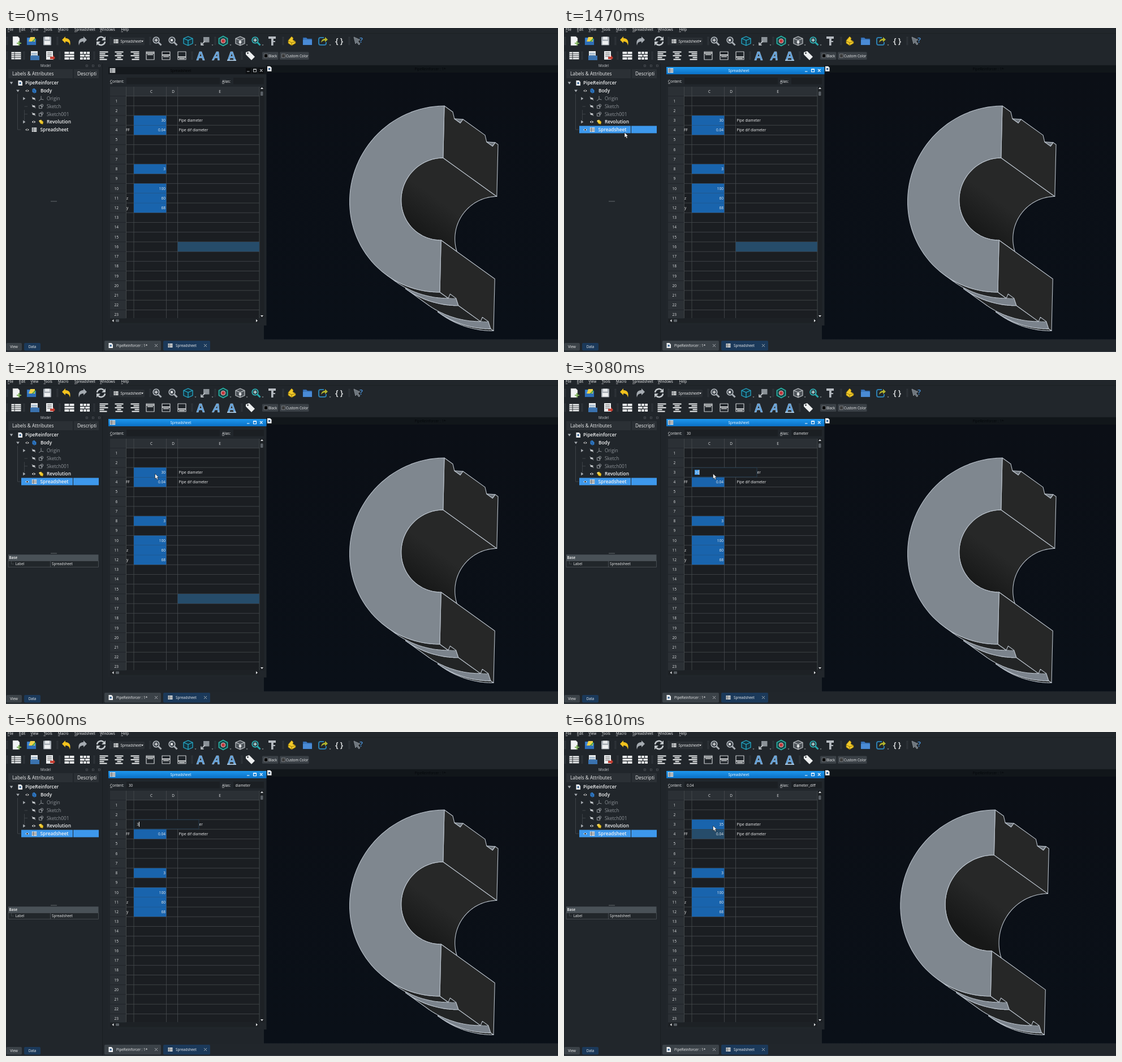
An HTML page that plays this animation: 976x574 px, repeating every 8 s.

```html
<!DOCTYPE html>
<html lang="en">
<head>
<meta charset="utf-8">
<title>Parametric pipe</title>
<style>
html,body{margin:0;width:100%;height:100%;overflow:hidden;background:#21262b}
svg{display:block;width:100vw;height:100vh}
text{font-family:"Open Sans","Noto Sans",sans-serif;white-space:pre}
</style>
</head>
<body>
<svg id="stage" viewBox="0 0 976 574" xmlns="http://www.w3.org/2000/svg"></svg>
<script>
const LOOP = 8000;
const BG = '#21262b', CELL = '#1b1e22', HEAD = '#2b3035', GRID = '#484c50';
const BLUE = '#1964ad', PICK = '#264c6a', HI = '#3d98ec', FG = '#eff0f1';

// Markup helpers
const rect = (x, y, w, h, fill, more = '') =>
  `<rect x="${x}" y="${y}" width="${w}" height="${h}" fill="${fill}" ${more}/>`;
const path = (d, fill = 'none', stroke = 'none', w = 1, more = '') =>
  `<path d="${d}" fill="${fill}" stroke="${stroke}" stroke-width="${w}" stroke-linejoin="round" ${more}/>`;
const circle = (x, y, r, fill, stroke = 'none', w = 1) =>
  `<circle cx="${x}" cy="${y}" r="${r}" fill="${fill}" stroke="${stroke}" stroke-width="${w}"/>`;
const text = (x, y, s, size = 6.4, fill = FG, more = '') =>
  `<text x="${x}" y="${y}" font-size="${size}" fill="${fill}" ${more}>${s}</text>`;
const group = (id, body) => `<g id="${id}">${body}</g>`;
const at = (x, y, body) => `<g transform="translate(${x} ${y})">${body}</g>`;
const MID = 'text-anchor="middle"', END = 'text-anchor="end"', BOLD = 'font-weight="600"';

// Shared icons, centred on 0,0
const tableIcon = (w, h, line = BG) =>
  rect(-w / 2, -h / 2, w, h, '#eceeef') +
  path(`M${-w / 2} ${-h / 4}h${w}M${-w / 2} 0h${w}M${-w / 2} ${h / 4}h${w}M${-w / 6} ${-h / 2}v${h}`, 'none', line, h / 14);
const docIcon = path('M-3.5-4.5H1.5L4-2V4.5H-3.5Z', '#eef0f2') + rect(-1.5, -1.3, 3.2, 3.2, '#35618f');
const grip = (x, y) => path(`M${x} ${y - 7}v14M${x + 1.8} ${y - 7}v14`, 'none', '#555b61', .8, 'stroke-dasharray="1 1.2"');
const lens = (c, inner) => path('M2 2L7.5 7.5', 'none', c, 3) + circle(-1.5, -1.5, 5.3, '#343b42', c, 1.8) + inner;
const cube = (fill, line) => path('M0-8L8-4.5V4.5L0 8L-8 4.5V-4.5Z', fill, line, 1.2) + path('M-8-4.5L0-1L8-4.5M0-1V8', 'none', line, 1.2);
const page = path('M-6-8H3L6-5V8H-6Z', '#f1f3f4', '#888', .5);
const folder = (c) => path('M-8-6H-2L0-4H8V7H-8Z', c, '#163a68', .6);
const bend = (c) => path('M-8-2L-2-8V-5C5-5 8 0 6 8C5 2 2 1-2 1V4Z', c);
const bars = (list, x) => list.map((w, i) => rect(x(w), -7.5 + i * 3.3, w, 2, '#eceeef')).join('');
const vbox = (y) => path('M-7-7H7V7H-7Z', 'none', '#c9cccf', 1.2) + rect(-7, y, 14, 1.8, '#eceeef') + rect(-5, y + 3, 10, 1.4, '#eceeef');
const bricks = (d) => rect(-8.5, -7, 17, 14, '#eceeef') + path(d, 'none', BG, 1.2);
const letterA = (more) => text(0, 7.5, 'A', 21, '#5d9fda', `${MID} font-weight="700" stroke="#cfe3f5" stroke-width=".4" ${more}`);

function toolbars() {
  const menu = [['File', 3], ['Edit', 23], ['View', 43.5], ['Tools', 66.5], ['Macro', 92], ['Spreadsheet', 121], ['Windows', 166], ['Help', 203.5]];
  const top = [
    [18, page + path('M1 4H9M5 0V8', 'none', '#7fb35c', 2.2)],
    [45, folder('#3f86d6') + path('M-6 5L-2-7H6V4Z', '#f0d24a') + path('M0 3L7-4', 'none', '#4aa64a', 2.2) + rect(-8, 1, 16, 6, '#2f6fb8')],
    [73, rect(-7, -7.5, 14, 15, '#a9b0b7', 'rx="1"') + rect(-4, -7.5, 8, 5, '#e7eaec') + rect(-5, 0, 10, 6.5, '#eef0f1')],
    [107, bend('#f2c21d')],
    [135, `<g transform="scale(-1 1)">${bend('#a5abb1')}</g>`],
    [168, path('M-7-1A7 7 0 0 1 5-5M7 1A7 7 0 0 1-5 5', 'none', '#c3c8cc', 2.6) + path('M8-8V-1H1ZM-8 8V1H-1Z', '#c3c8cc')],
    [267, lens('#a8aeb4', path('M-4.5-1.5H1.5M-1.5-4.5V1.5', 'none', '#e5e7e9', 1.5))],
    [295, lens('#a8aeb4', rect(-4, -3.5, 4, 4, '#e5e7e9'))],
    [322, cube('#16333e', '#25b5d6')],
    [352, rect(-3, -7, 10.5, 9.5, '#8b9298') + path('M-7 7L0 0M-7 2.5V7H-2.5', 'none', '#b3b8bd', 1.8)],
    [384, path('M0-8.5L7.5-4.5V4.5L0 8.5L-7.5 4.5V-4.5Z', '#173f42', '#28b3a5', 1.8) + circle(0, 0, 3.8, '#c43a3f', '#eee', .8)],
    [414, cube('#4d5359', '#c0c5c9') + circle(0, 2, 2.4, '#dfe2e4')],
    [442, lens('#28a8ac', path('M-4.5-1.5H1.5M-1.5-4.5V1.5', 'none', '#bdeff0', 1.6))],
    [470, rect(-1, -8, 3.6, 16, '#b5bac0') + path('M-6-8H7V-4H2.6V0H6V2H-1V-4H-6Z', '#b5bac0')],
    [505, path('M-6-1L0-8L3-5L2-2L7 1V4L0 8L-6 4Z', '#f0c829', '#8a6e0a', .8) + path('M-6 0L0 3L7 1M0 3V8', 'none', '#8a6e0a', .9)],
    [533, folder('#3b77be') + rect(-8, -2, 16, 9, '#4a8bd6')],
    [560, path('M2-6H-4Q-7-6-7-3V4Q-7 7-4 7H3Q6 7 6 4V2', 'none', '#2c7fb0', 2) + path('M-3 3Q-2-4 4-4V-7L9-2.5L4 2V-1Q0-1-3 3Z', '#b3b52e')],
    [589, text(0, 5, '{ }', 14, '#e8eaeb', `${MID} ${BOLD}`)],
    [622, path('M-7-7L4-2L0 0L4 5L2 7L-2 2L-4 5Z', '#6d757c', '#9da3a9', .7) + text(6, 3, '?', 13, '#4b96dd', `${MID} ${BOLD}`)]
  ];
  const low = [
    [18, tableIcon(17, 13)],
    [51, rect(-7, -8, 12, 10, '#eceeef') + rect(-8, 0, 16, 8, '#3a72ae') + path('M-6-4H4M-6-1H4', 'none', '#45749f')],
    [78, rect(-7, -8, 12, 15, '#eceeef') + path('M-5-5H3M-5-2H3M-5 1H3', 'none', '#666') + path('M0 2H5V-1L9 4L5 8V6H0Z', '#c43d31')],
    [112, bricks('M-9-2.3H9M-9 2.3H9M0-7V-2.3M0 2.3V7')],
    [139.5, bricks('M-9-2.3H9M-9 2.3H9M-3-7V-2.3M3-7V-2.3M0-2.3V2.3M-3 2.3V7M3 2.3V7')],
    [173, bars([15, 10, 15, 8, 13], () => -7.5)],
    [200, bars([15, 9, 15, 7, 13], w => -w / 2)],
    [228, bars([15, 10, 15, 8, 13], w => 7.5 - w)],
    [255, vbox(-5.5)], [283, vbox(-2)], [311, vbox(1.5)],
    [344, letterA('')], [372, letterA('font-style="italic"')],
    [399, letterA('') + rect(-8, 7.5, 16, 1.6, '#b9d7f0')],
    [432, path('M-8-6L-2-8L8 2L2 8L-8-2Z', '#eceeef') + circle(-4.5, -4.5, 1.3, BG)]
  ];
  const swatch = (x, w, c, s) => rect(x, 42.5, w, 13.5, '#3a4046', 'rx="1.5"') +
    rect(x + 3.5, 46, 6, 6.5, c, 'stroke="#8a8f94" stroke-width=".7"') + text(x + 11, 51.6, s, 6.2);
  return menu.map(([s, x]) => text(x, 5.3, s, 6.3) + rect(x, 6.5, 3.4, .6, FG)).join('') +
    path('M0 9.5H976', 'none', '#1c2024') +
    [1, 90, 184, 254, 369, 489, 606].map(x => grip(x, 23)).join('') +
    [1, 31, 94, 155, 328, 416].map(x => grip(x, 49)).join('') +
    top.map(([x, s]) => at(x, 23, s)).join('') + low.map(([x, s]) => at(x, 49, s)).join('') +
    [335, 365, 397, 426, 454, 573].map(x => path(`M${x - 1.5} 29.5h3l-1.5 1.8z`, '#a0a5a9')).join('') +
    rect(187, 17, 58, 13.5, '#2a2f34', 'rx="1.5"') + at(194.5, 23.5, tableIcon(8, 7)) +
    text(202.5, 25.7, 'Spreadsheet', 6.3) + path('M239 22.5h4l-2 2.6z', FG) +
    swatch(453, 28.5, '#000', 'Black') + swatch(484, 51.5, '#3a3a3a', 'Custom Color');
}

function modelPanel() {
  const eye = (x, y) => at(x, y, path('M-3.2 0Q0-3.6 3.2 0Q0 3.6-3.2 0Z', '#e8eaec') + circle(0, 0, 1.2, '#111'));
  const shut = (y) => at(49, y, path('M-3.2 0Q0-3.6 3.2 0Q0 3.6-3.2 0Z', '#b9bdc1') + path('M-3.2-2.8L3.2 2.8', 'none', '#e4e6e8', 1));
  const down = (x, y) => path(`M${x - 2.8} ${y - 1.8}h5.6l-2.8 4.2z`, '#a9aeb3');
  const right = (x, y) => path(`M${x - 1.8} ${y - 2.8}v5.6l4.2-2.8z`, '#a9aeb3');
  const sketch = (y) => at(62, y, path('M-3.5-1.5H1.5V3.5H-3.5Z', 'none', '#a4a9ad', .9) + circle(1.5, -1.5, 2.2, 'none', '#a4a9ad', .9));
  const Y = i => 97.4 + i * 13.8;
  const name = (x, i, s, dim) => text(x, Y(i) + 3, s, 8.3, dim ? '#8d9297' : '#f0f1f2', dim ? '' : BOLD);
  return text(70, 69.3, 'Model', 6.2, '#c9ccd0', MID) +
    [143, 154, 165].map(x => rect(x - 1.5, 65.5, 3, 3, 'none', 'stroke="#565b60" stroke-width=".7"')).join('') +
    rect(4, 73, 114, 16, HEAD) + rect(120, 73, 44, 16, HEAD) +
    text(11, 84, 'Labels &amp; Attributes', 8.3) + text(126, 84, 'Descripti', 8.3) +
    path('M20.5 117V180H26M32.5 145V166M32.5 139H38M32.5 152.5H38', 'none', '#4a4f54', .7) +
    group('row', rect(27, 173.4, 91, 13, HI) + rect(119, 173.4, 45, 13, HI)) +
    down(9.5, Y(0)) + at(25, Y(0), docIcon) + name(34, 0, 'PipeReinforcer') +
    down(21, Y(1)) + eye(37.5, Y(1)) + at(50, Y(1), path('M-3.5-3L0-4.5L3.5-1V3L0 4.5L-3.5 2Z', '#2f78c4') + path('M-3.5-3L0 0V4.5', 'none', '#173f70', .8)) + name(61, 1, 'Body') +
    right(32, Y(2)) + shut(Y(2)) + at(62, Y(2), path('M0-4.5V1L-4 4M0 1L4.5 2', 'none', '#8d9297')) + name(72, 2, 'Origin', 1) +
    shut(Y(3)) + sketch(Y(3)) + name(72, 3, 'Sketch', 1) +
    shut(Y(4)) + sketch(Y(4)) + name(72, 4, 'Sketch001', 1) +
    right(32, Y(5)) + eye(49, Y(5)) + at(62, Y(5), path('M-4-2L0-4L4 0L3 4L-1 3Z', '#edc72b', '#8a6e0a', .6) + circle(-2, -2, 1.2, '#f7e9a0')) + name(72, 5, 'Revolution') +
    eye(37.5, Y(6)) + at(50, Y(6), tableIcon(8.5, 7.5)) + name(60.5, 6, 'Spreadsheet') +
    rect(79, 306.6, 11, .9, '#6b7075') +
    group('props', rect(4, 309.3, 159.5, 11, '#495157') + text(5.5, 317.2, 'Base', 6.4, '#f4f4f4', BOLD) +
      rect(4, 320.5, 159.5, 11, '#22272b', 'stroke="#555b60" stroke-width=".7"') +
      path('M78.5 320.5V331.5', 'none', '#555b60', .7) + path('M9.5 320.5V326H14', 'none', '#555b60', .6) +
      text(16.5, 328.4, 'Label', 6.3) + text(81, 328.4, 'Spreadsheet', 6.3)) +
    rect(.5, 558, 27.5, 13.5, '#3b4248', 'rx="2"') + text(14, 567.2, 'View', 6.2, FG, MID) +
    rect(32, 558, 29, 13.5, '#1b395a', 'rx="2"') + text(46.5, 567.2, 'Data', 6.2, FG, MID);
}

function sheet() {
  const top = 120.6, pitch = 17.22;
  const rowY = r => top + (r - 1) * pitch;
  const base = r => rowY(r) + 11;
  const fillCell = (r, x, w, fill, id = '') => rect(x, rowY(r) + .1, w, pitch - .2, fill, id && `id="${id}"`);
  const winButtons = c => path('M426 77h4.5M437.5 72.8h5v5h-5zM437.5 73.5h5M449 73l4.5 4.5M453.5 73l-4.5 4.5', 'none', c, 1.1);
  let s = rect(181, 68.5, 279.5, 458.5, BG) +
    group('off', rect(181, 69, 279.5, 13, '#15191d') + text(309, 78, 'Spreadsheet', 6.3, '#050607', MID) +
      [424, 435, 446.5].map(x => rect(x, 71, 9, 9.5, '#0a0c0e')).join('') + winButtons('#b4b8bb')) +
    group('on', rect(181, 69, 279.5, 13, 'url(#bar)') + text(309, 78, 'Spreadsheet', 6.3, '#fff', MID) + winButtons('#fff')) +
    at(188.5, 75.3, tableIcon(9.5, 8)) +
    text(184, 96.6, 'Content:', 6.2) + rect(184, 98, 4, .6, FG) + text(382, 96.6, 'Alias:', 6.2) + rect(382, 98, 4, .6, FG) +
    rect(213, 88, 165, 11.5, '#1b1f23') + rect(402, 88, 54, 11.5, '#1b1f23') +
    `<text id="content" x="217" y="96.6" font-size="6.3" fill="${FG}"/><text id="alias" x="405.5" y="96.6" font-size="6.3" fill="${FG}"/>` +
    rect(184, 104, 264, 410.5, CELL) + rect(184, 104, 264, 16.6, HEAD) + rect(184, 104, 28.5, 410.5, HEAD);
  for (let r = 1; r <= 23; r++) {
    s += path(`M212.5 ${rowY(r)}H448`, 'none', GRID, .8) + path(`M184 ${rowY(r)}h28.5`, 'none', '#1f2327', .8) +
      text(195.3, base(r), r, 6.5, '#dfe1e3', MID);
  }
  s += path('M212.5 104V514M226 104V514M283.5 104V514M303.5 104V514M448 104V514', 'none', GRID, .8) +
    [['C', 257], ['D', 295.5], ['E', 378]].map(([c, x]) => text(x, 114.7, c, 6.5, '#dfe1e3', MID)).join('');
  [3, 4, 8, 10, 11, 12].forEach(r => s += fillCell(r, 226, 57.4, BLUE, r < 5 ? 'c' + r : ''));
  s += fillCell(16, 303.6, 144.2, PICK, 'e16');
  [[4, '0.04'], [8, 3], [10, 100], [11, 60], [12, 68]].forEach(([r, v]) => s += text(282, base(r), v, 6.5, FG, END));
  s += `<text id="v3" x="282" y="${base(3)}" font-size="6.5" fill="${FG}" ${END}/>` +
    text(305.5, base(3), 'Pipe diameter', 6.5) + text(305.5, base(4), 'Pipe dif diameter', 6.5) +
    text(212, base(4), 'FF', 6.5) + text(213, base(11), 'z', 6.5) + text(213, base(12), 'y', 6.5) +
    rect(449, 104, 7.5, 410.5, '#1d2125') + rect(450, 112.5, 4.5, 7.5, '#5a6066', 'rx="1"') +
    path('M450 108h5l-2.5-3zM450 509h5l-2.5 3z', '#e0e2e4') +
    rect(184, 515, 264, 7.5, '#1d2125') + rect(194, 516.2, 6, 4.5, '#5a6066', 'rx="1"') +
    path('M190.5 516v5l-3-2.5zM442 516v5l3-2.5z', '#e0e2e4') +
    group('editor', rect(226.5, 155.4, 114.5, 16.3, '#1b1f23', 'stroke="#243a4d" stroke-width="1"') +
      rect(231, 159, 8, 9, HI, 'id="mark"') + `<text id="edit" x="231.2" y="166" font-size="6.5" fill="#eef0f2"/>` +
      rect(231, 159, .9, 9, '#fff', 'id="caret"'));
  return s;
}

// Half section of a grooved ring: z runs 0..1 along the axis, angle 0 is up, 180 down
const OUTER = 34, GROOVE = 32, RIM = 144.8;
const PROFILE = [0, .158, .19, .3, .347, .758, .79, .9, .947, 1]
  .map((z, i) => [z, [2, 3, 6, 7].includes(i) ? GROOVE : OUTER]);

function pipe(dia) {
  const bore = dia / 2 + .04, cx = 771 - (dia - 30) * 2.54;
  const point = (z, r, deg) => {
    const a = deg * Math.PI / 180, c = Math.cos(a) * r / OUTER, s = Math.sin(a) * r / OUTER;
    return [cx + 95 * z + 4 * c - 163.4 * s, 303 + 68.5 * z - 165 * c + .5 * s].map(v => v.toFixed(2)).join(' ');
  };
  const arc = (z, r, from, to) => Array.from({ length: 61 }, (_, i) => point(z, r, from + (to - from) * i / 60));
  const shape = (pts, fill, line = '#b9c1ca') => path('M' + pts.join('L') + 'Z', fill, line, 1.1);
  const section = deg => shape([...PROFILE.map(([z, r]) => point(z, r, deg)), point(1, bore, deg), point(0, bore, deg)], '#262727');
  const lit = i => shape([i - 2, i - 1, i].map(k => point(...PROFILE[k], 0)), '#6d747b');

  let s = '';
  for (let i = PROFILE.length - 1; i > 0; i--) {
    const [z0, r0] = PROFILE[i - 1], [z1, r1] = PROFILE[i];
    s += shape([...arc(z0, r0, RIM, 180), ...arc(z1, r1, 180, RIM)], r1 > r0 ? '#7b838c' : '#222425', r1 < OUTER ? 'none' : undefined);
  }
  return s +
    shape([...arc(0, bore, 0, 180), ...arc(1, bore, 2 * RIM - 180, 0)], 'url(#bore)') +
    section(0) + section(180) + lit(4) + lit(8) +
    shape([...arc(0, OUTER, 0, 180), ...arc(0, bore, 180, 0)], '#7f878f');
}

const $ = id => document.getElementById(id);
$('stage').innerHTML = `<defs>
  <linearGradient id="bar" x2="0" y2="1"><stop stop-color="#1d97ee"/><stop offset="1" stop-color="#0b70c4"/></linearGradient>
  <linearGradient id="sky" x2="0" y2="1"><stop stop-color="#0b0f16"/><stop offset="1" stop-color="#0a1018"/></linearGradient>
  <linearGradient id="bore" gradientUnits="userSpaceOnUse" x1="726" y1="363" x2="767" y2="306"><stop stop-color="#171818"/><stop offset="1" stop-color="#272828"/></linearGradient>
  </defs>` +
  rect(0, 0, 976, 574, BG) + toolbars() + modelPanel() +
  rect(170, 63, 1.2, 511, '#191d21') +
  rect(171, 64, 805, 488, '#20252a') + rect(456, 79, 520, 472.5, 'url(#sky)') +
  rect(460, 66, 516, 13, '#11161a') + at(465.5, 72.3, docIcon) +
  text(750, 74.7, 'PipeReinforcer : 1*', 6.3, '#04070a', MID) +
  group('pipe', '') + sheet() +
  rect(174, 554, 100, 17.5, '#3b4248', 'rx="2"') + at(185, 562.5, docIcon) + text(195, 565, 'PipeReinforcer : 1*', 6.3) +
  rect(278, 554, 83, 17.5, '#1b395a', 'rx="2"') + at(290.5, 562.5, tableIcon(8, 7)) + text(300, 565, 'Spreadsheet', 6.3) +
  path('M263 560l5 5M268 560l-5 5M350 560l5 5M355 560l-5 5', 'none', '#b3b8bc', .9) +
  rect(0, 573, 976, 1, '#3a4046') +
  group('arrow', path('M0 0V9L2.1 7.2L3.6 10.5L5.2 9.8L3.8 6.6H6.5Z', '#fff', '#111', .6)) +
  group('split', path('M-6 0L-3-2.8V-.7H3V-2.8L6 0L3 2.8V.7H-3V2.8ZM-1.4-4.5V4.5M1.4-4.5V4.5', '#fff', '#fff', .8)) +
  group('beam', path('M-2.2-5H2.2M0-5V5M-2.2 5H2.2', 'none', '#f2f2f2', .9));

const show = (id, on) => $(id).style.display = on ? '' : 'none';
const put = (id, s) => { if ($(id).textContent !== s) $(id).textContent = s; };
const fill = (id, c) => $(id).setAttribute('fill', c);
const within = (t, a, b) => t >= a && t < b;
const ease = p => (1 - Math.cos(Math.PI * p)) / 2;
// Pointer samples arrive at a low, steady rate
const glide = (t, start, gap, n, a, b) => {
  const p = ease(Math.min(n, Math.max(0, Math.floor((t - start) / gap))) / n);
  return a.map((v, i) => v + (b[i] - v) * p);
};

let drawn = 0;
function render(t) {
  const picked = t >= 2950, done = t >= 6810, dia = done ? 35 : 30;
  show('row', t >= 1330);
  show('on', t >= 1400);
  show('off', t < 1400);
  show('props', t >= 1530);
  show('e16', !picked);
  fill('c3', picked && !done ? PICK : BLUE);
  fill('c4', done ? PICK : BLUE);
  put('v3', String(dia));
  put('content', done ? '0.04' : picked ? '30' : '');
  put('alias', done ? 'diameter_diff' : picked ? 'diameter' : '');

  show('editor', within(t, 3080, 6810));
  show('mark', t < 4470);
  put('edit', t < 4470 ? '30' : t < 5600 ? '' : t < 5930 ? '3' : '35');
  show('caret', within(t, 3080, 3610) || within(t, 4140, 5200) || within(t, 5600, 6540));
  $('caret').setAttribute('x', within(t, 4470, 5600) ? 231 : within(t, 5600, 5930) ? 235 : 238.5);

  const pos = t < 2260 ? glide(t, 440, 75.9, 10, [850, 567], [107, 185])
    : glide(t, 2260, 68, 8, [170, 188], [263.5, 166]);
  const split = within(t, 2260, 2328);
  show('arrow', !split && (within(t, 440, 3150) || t >= 6740));
  show('split', split);
  show('beam', within(t, 3740, 4470));
  ['arrow', 'split', 'beam'].forEach(id => $(id).setAttribute('transform', `translate(${pos[0]} ${pos[1]})`));

  if (drawn !== dia) $('pipe').innerHTML = pipe(drawn = dia);
}

const begin = performance.now();
function tick() {
  render((performance.now() - begin) % LOOP);
  requestAnimationFrame(tick);
}
tick();
</script>
</body>
</html>
```
